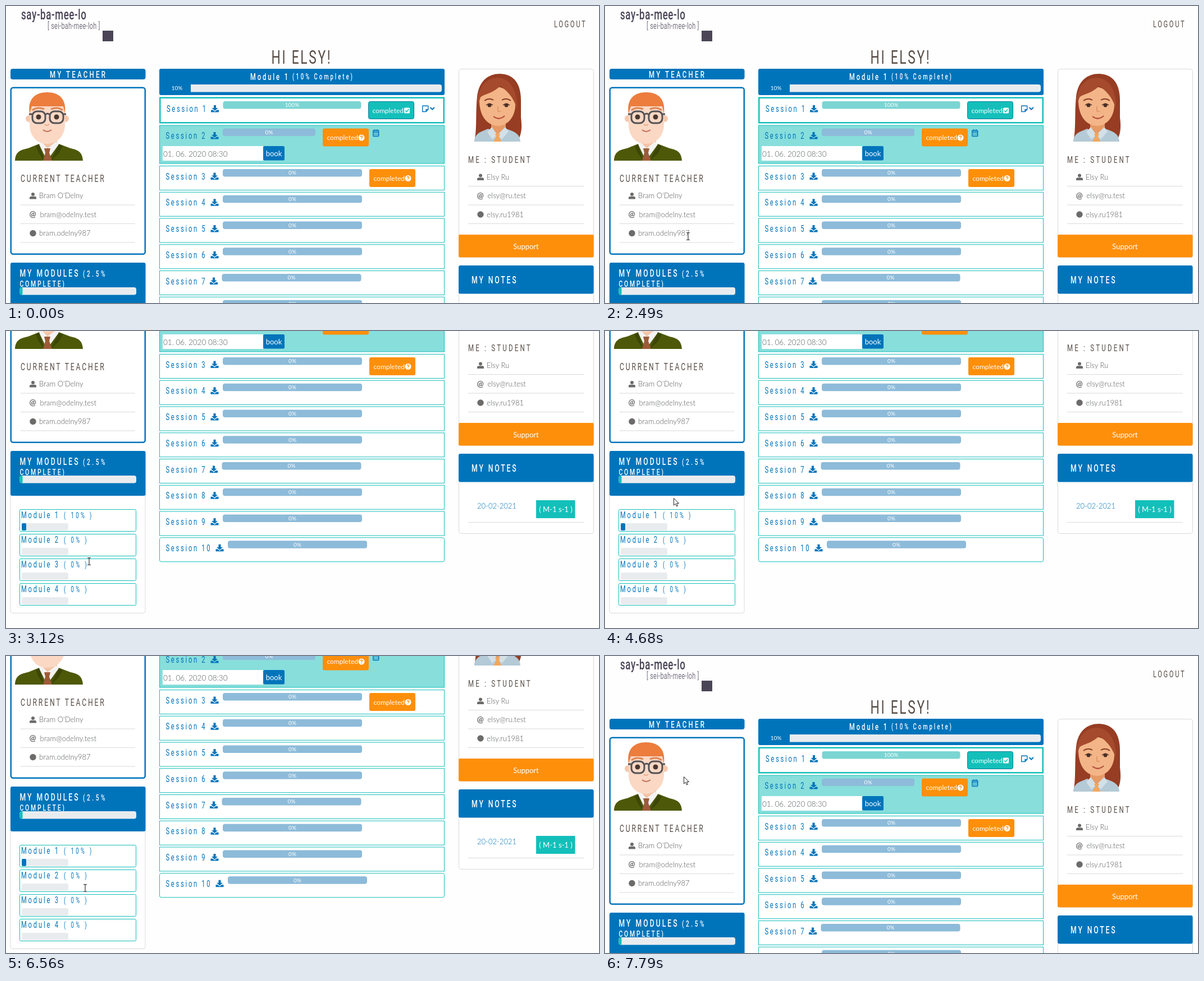
Animation, 1056 px wide and 530 px high, one loop 8000 ms. Source, as an HTML page:

```html
<!DOCTYPE html>
<html lang="en">
<head>
<meta charset="utf-8">
<title>Course dashboard</title>
<style>
  html, body { margin: 0; width: 100%; height: 100%; overflow: hidden; background: #fefefe; }
  svg { display: block; }
  text { font-family: Lato, 'Open Sans', sans-serif; font-weight: 300; white-space: pre; }
  .head { font-family: Roboto, 'Noto Sans', sans-serif; font-weight: 400; }
  .bold { font-weight: 500; }
  #page { animation: scroll 8s step-end infinite; }
  #arrow { animation: arrow 8s step-end infinite; }
  #beam { animation: beam 8s step-end infinite; }
  @keyframes scroll {
    0% { transform: translateY(0); }
    35.125% { transform: translateY(-152px); }
    39% { transform: translateY(-244px); }
    82% { transform: translateY(-225px); }
    85.75%, 100% { transform: translateY(0); }
  }
  @keyframes arrow {
    0%, 31.125%, 50.75%, 62.5%, 78.125%, 89.75% { transform: translate(-50px, 0); }
    7.625% { transform: translate(906px, 501px); }
    11.625% { transform: translate(52px, 245px); }
    15.375% { transform: translate(43px, 236px); }
    19.375% { transform: translate(173px, 242px); }
    23.375% { transform: translate(78px, 251px); }
    27.125% { transform: translate(56px, 386px); }
    42.75% { transform: translate(124px, 306px); }
    46.75% { transform: translate(21px, 337px); }
    54.5% { transform: translate(192px, 372px); }
    58.5% { transform: translate(122px, 298px); }
    66.5% { transform: translate(81px, 435px); }
    70.5% { transform: translate(155px, 342px); }
    74.125% { transform: translate(33px, 350px); }
    85.75% { transform: translate(139px, 410px); }
    97.375%, 100% { transform: translate(140px, 215px); }
  }
  @keyframes beam {
    0%, 42.75%, 54.5%, 66.5%, 97.375%, 100% { transform: translate(-50px, 0); }
    31.125% { transform: translate(144px, 404px); }
    50.75% { transform: translate(62px, 415px); }
    62.5% { transform: translate(39px, 356px); }
    78.125% { transform: translate(137px, 407px); }
    89.75% { transform: translate(137px, 404px); }
  }
</style>
</head>
<body>
<svg width="1056" height="530" viewBox="0 0 1056 530">
  <defs>
    <g id="download" fill="#0074bb">
      <path d="M5 0h4v5h3.5L7 10 1.500 5H5z"/>
      <path d="M0 8.500h3.500L7 11.500l3.500-3H14v4H0z"/>
    </g>
    <g id="person" fill="#6c6b6a">
      <circle cx="6" cy="3" r="3"/>
      <path d="M0 11.500V9.500Q0 6.800 3 6.800H9Q12 6.800 12 9.500V11.500z"/>
    </g>
    <g id="ask">
      <circle r="5.500" fill="#fff"/>
      <path d="M-1.700-1.300C-1.500-3.600 1.900-3.400 1.700-1.300 1.600-.2 0-.2 0 1.200M0 2.400V3.600" fill="none" stroke="#fe8f0a" stroke-width="1.400"/>
    </g>
    <g id="teacher">
      <path d="M46 82h29v24H46z" fill="#f3c4a6"/>
      <path d="M0 122C1 106 9 103 23 100L43 92 58 112 78 92 99 100C113 103 120 107 121 122z" fill="#4d5908"/>
      <path d="M43 93L57 122 78 93 73 88 58 100 47 88z" fill="#f3f3f3"/>
      <path d="M52 122L43 93 37 96 42 108zM64 122L78 93 85 96 78 109z" fill="#3c4606"/>
      <path d="M52 100h11l-2 8 5 14H50l4-14z" fill="#9b5b38"/>
      <circle cx="25" cy="47" r="6" fill="#f5c8ad"/><circle cx="90" cy="47" r="6" fill="#f5c8ad"/>
      <path d="M26 24H89V57C89 77 76 92 57 92S26 77 26 57z" fill="#fad8c4"/>
      <path d="M26 38C22 12 36 0 57 0 79 0 92 12 89 38L86 25H30z" fill="#ec7d3d"/>
      <path d="M31 32Q40 25 52 30M64 30Q76 25 85 32" fill="none" stroke="#df8453" stroke-width="3"/>
      <circle cx="42" cy="44" r="4.500" fill="#49382f"/><circle cx="74" cy="44" r="4.500" fill="#49382f"/>
      <g fill="none" stroke="#545255" stroke-width="3">
        <rect x="31" y="34" width="23" height="21" rx="8"/>
        <rect x="62" y="34" width="24" height="21" rx="8"/>
        <path d="M54 40Q58 36 62 40M25 39h6M86 39h5"/>
      </g>
      <path d="M53 57Q57 61 61 57" fill="none" stroke="#e7ad8d" stroke-width="2"/>
      <path d="M50 67Q57 73 65 67" fill="none" stroke="#c66f58" stroke-width="2"/>
    </g>
    <g id="student">
      <path d="M1 122C6 101 3 69 6 42 9 13 27 0 48 1 73 2 84 21 84 48V79C86 95 86 110 77 122z" fill="#963d23"/>
      <path d="M31 76h26v32H31z" fill="#e69a66"/>
      <path d="M1 122C2 108 10 105 26 99L41 112 57 99C73 104 82 108 83 122z" fill="#b4cad7"/>
      <path d="M32 96L42 110 56 96 62 104 50 118 42 110 33 118 24 105z" fill="#d3e0e7"/>
      <path d="M38 108h9l-2 5 4 9H35l5-9z" fill="#f3a65b"/>
      <path d="M10 45C13 31 31 24 41 24 61 27 74 41 74 56 74 78 60 94 43 94 22 93 9 74 10 45z" fill="#f3b587"/>
      <path d="M7 58C5 30 18 9 42 8 66 8 78 33 77 64 70 39 55 29 47 22 36 36 17 37 12 43z" fill="#a54a2d"/>
      <path d="M19 49Q27 43 35 48M50 48Q58 43 66 49" fill="none" stroke="#883b24" stroke-width="2"/>
      <path d="M22 57Q28 52 34 57M52 57Q58 52 64 57" fill="none" stroke="#533026" stroke-width="1.500"/>
      <circle cx="28" cy="57" r="3.500" fill="#4c3023"/><circle cx="58" cy="57" r="3.500" fill="#4c3023"/>
      <path d="M43 59V67Q45 70 48 67" fill="none" stroke="#db9468" stroke-width="1.700"/>
      <path d="M35 77Q45 85 55 76" fill="none" stroke="#b64e3e" stroke-width="2.200"/>
    </g>
  </defs>
  <g id="page"></g>
  <path id="arrow" d="M.5.500V13L3.500 10.300 5.500 15 7.500 14 5.600 9.600H9.500z" fill="#fff" stroke="#222" stroke-width="1"/>
  <path id="beam" d="M1 .5H3L4 1.500 5 .5H7M4 1.500V12.500M1 13.500H3L4 12.500 5 13.500H7" fill="none" stroke="#333" stroke-width="1.200"/>
</svg>
<script>
const BLUE = '#0074bb', TEAL = '#14bfba', ORANGE = '#fe8f0a', INK = '#574d46',
      GREY = '#6c6b6a', TRACK = '#e9ecef', RULE = '#d9dadb';
const CONDENSE = .68;

const rect = (x, y, w, h, fill, r = 0, more = '') =>
  `<rect x="${x}" y="${y}" width="${w}" height="${h}" rx="${r}" fill="${fill}" ${more}/>`;
const box = (x, y, w, h, line, r = 0, fill = '#fff', sw = 1) =>
  rect(x + sw / 2, y + sw / 2, w - sw, h - sw, fill, r, `stroke="${line}" stroke-width="${sw}"`);
const use = (id, x, y) => `<use href="#${id}" x="${x}" y="${y}"/>`;
const rule = (x, y, w) => rect(x, y, w, 1, RULE);
const label = (x, y, str, size = 13, fill = '#54565a', more = '') =>
  `<text x="${x}" y="${y}" font-size="${size}" fill="${fill}" ${more}>${str}</text>`;
const mid = (x, y, str, size, fill = '#fff', weight = 400) =>
  label(x, y, str, size, fill, `text-anchor="middle" style="font-weight:${weight}"`);

// Narrow, widely tracked headings
const head = (x, y, str, size, fill = INK, gap = 2.8, cls = '') =>
  `<text class="head ${cls}" transform="translate(${x} ${y}) scale(${CONDENSE} 1)" font-size="${size}" ` +
  `letter-spacing="${gap / CONDENSE}" fill="${fill}">${str}</text>`;
const white = (x, y, str, size, gap = 3) => head(x, y, str, size, '#fff', gap, 'bold');

const bar = (x, y, w, fill, str) => rect(x, y, w, 13.5, fill, 4) + mid(x + w / 2, y + 10.300, str, 10);

function doneButton(x, y, done) {
  const w = 82, tx = x + 7.500;
  return (done ? box(x, y, w, 32, '#0b7f96', 3, TEAL) : rect(x, y, w, 32, ORANGE, 3)) +
    label(tx, y + 20.500, 'completed', 12, '#fff', 'style="font-weight:400"') +
    (done
      ? rect(x + 64, y + 11.500, 10, 10, '#fff', 1.500) +
        `<path d="M${x + 66} ${y + 16.500}l2.300 2.300 4-4.500" fill="none" stroke="${TEAL}" stroke-width="1.600"/>`
      : use('ask', x + 69, y + 16.500));
}

function contacts(x, y, width, name, mail, handle) {
  const ix = x + 16, rules = [0, 1, 2].map(i => rule(x, y + 16 + i * 33.500, width)).join('');
  return rules + use('person', ix, y - 5.500) + label(ix + 17, y + 4.500, name) +
    label(ix - .5, y + 37.500, '@', 14.500, GREY, 'style="font-weight:700"') + label(ix + 18.500, y + 38, mail) +
    `<circle cx="${ix + 6}" cy="${y + 67}" r="5.700" fill="${GREY}"/>` + label(ix + 17, y + 71.500, handle);
}

function topArea() {
  return head(27, 24, 'say-ba-mee-lo', 25, '#4b4557', .6, 'bold') +
    head(74, 41, '[ sei-bah-mee-loh ]', 16, '#777280', .3) +
    rect(172, 44, 19, 19, '#4b4557') +
    head(976, 38, 'LOGOUT', 16.500, INK, 2.600) +
    head(472.500, 103, 'HI ELSY!', 33.500, INK, 2.700);
}

function leftColumn() {
  let s = rect(8, 112, 240.500, 19, BLUE, 4) + white(78, 128, 'MY TEACHER', 17, 3.200) +
    box(7.500, 144.500, 241.500, 299.500, BLUE, 4, '#fff', 2.500) + use('teacher', 16, 154) +
    head(26, 313.500, 'CURRENT TEACHER', 18) +
    contacts(26, 338.500, 204, "Bram O'Delny", 'bram@odelny.test', 'bram.odelny987');

  s += box(7.500, 458, 241, 290, RULE, 4) + rect(8, 458, 240.500, 80, BLUE, 3) +
    white(24.500, 483, 'MY MODULES', 18) + white(137, 483, '(2.5%', 15, 3.500) +
    white(24.500, 500.500, 'COMPLETE)', 15.500, 2.700) +
    rect(24.500, 502, 207.500, 13.500, TRACK, 4) + rect(24.500, 502, 5, 13.500, TEAL, 2);

  for (let i = 0; i < 4; i++) {
    const y = 562 + i * 44;
    s += box(24, y, 208, 40, TEAL, 2) + head(27, y + 16, 'Module ' + (i + 1), 16.500, BLUE) +
      head(103, y + 15.500, i ? '( 0% )' : '( 10% )', 14, BLUE, 3.400) + rect(28, y + 25, 83, 13, TRACK, 3);
    if (!i) s += rect(28, y + 25, 8, 13, BLUE, 2);
  }
  return s;
}

function session(n) {
  const y = n == 1 ? 162.500 : n == 2 ? 212.500 : 285 + (n - 3) * 46.750;
  const x = n == 1 ? 286 : 284.500;
  const shift = { 1: .5, 7: -1.500, 10: 9 }[n] || 0;
  const h = n == 1 ? 47 : n == 2 ? 69 : 44;
  const top = n == 1 ? 170 : y + 6;
  return box(273, y, 508, h, TEAL, n == 10 ? 3 : 0, n == 2 ? '#87dedb' : '#fff', n == 1 ? 2.500 : 1) +
    head(x, y + (n == 1 ? 26.500 : 24.500), 'Session ' + n, 16.500, BLUE, 2.700) +
    use('download', 364.500 + shift, top + (n == 1 ? 7 : 6.500)) +
    bar(386 + shift, top, n == 1 ? 246 : n == 2 ? 165 : 248, n == 1 ? '#7bd5d3' : '#8dbbd9', n == 1 ? '100%' : '0%');
}

function extras() {
  const dots = [656, 659, 662].map(x => rect(x - .8, 226, 1.600, 1.600, BLUE) + rect(x - .8, 229, 1.600, 1.600, BLUE)).join('');
  return doneButton(645, 170, true) + doneButton(564, 218.500) + doneButton(647, 291) +
    `<g fill="none" stroke="${BLUE}" stroke-width="1.400">
      <path d="M741.700 178.200h10v6.600l-3.700 3.700h-6.300zM751.700 184.800h-3.700v3.700"/>
      <path d="M755.500 181l3.700 3.700 3.700-3.700" stroke-width="2"/>
      <rect x="653.700" y="222" width="10" height="10.500" rx="1"/>
      <path d="M653.700 224.500h10M656.500 220v3M661 220v3"/>
    </g>` + dots +
    rect(279, 250, 179, 26, '#fff') + label(280, 268.500, '01. 06. 2020 08:30', 13.500) +
    rect(458, 250, 38, 25.500, BLUE, 2.500) + mid(477, 267.500, 'book', 13);
}

function middleColumn() {
  let s = rect(273, 112, 508, 47, BLUE, 3) + white(435, 131.500, 'Module 1', 16.500, 2.900) +
    white(510, 131, '(10% Complete)', 14) +
    rect(279, 140, 497, 13.500, TRACK, 4) + rect(278, 139.500, 51, 14.500, BLUE) + mid(304.500, 150.300, '10%', 10);
  for (let n = 1; n <= 10; n++) s += session(n);
  return s + extras();
}

function rightColumn() {
  return box(806, 112, 241, 337, RULE, 4) + use('student', 833, 120) +
    head(823, 279.500, 'ME : STUDENT', 17, INK, 3.200) +
    contacts(823, 305, 206, 'Elsy Ru', 'elsy@ru.test', 'elsy.ru1981') +
    rect(806, 408, 240.500, 40.500, ORANGE, 2) + mid(926, 433.500, 'Support', 13) +
    box(806, 463, 241, 143, RULE, 4) + rect(806, 463, 240.500, 50.500, BLUE, 3) +
    white(829, 494.500, 'MY NOTES', 18, 2.900) +
    label(839, 560.500, '20-02-2021', 13, BLUE) + rule(823, 585, 206) +
    rect(944, 546, 69.500, 32, TEAL) + mid(979, 566.500, '( M-1 s-1 )', 13);
}

document.getElementById('page').innerHTML = topArea() + leftColumn() + middleColumn() + rightColumn();
</script>
</body>
</html>
```
